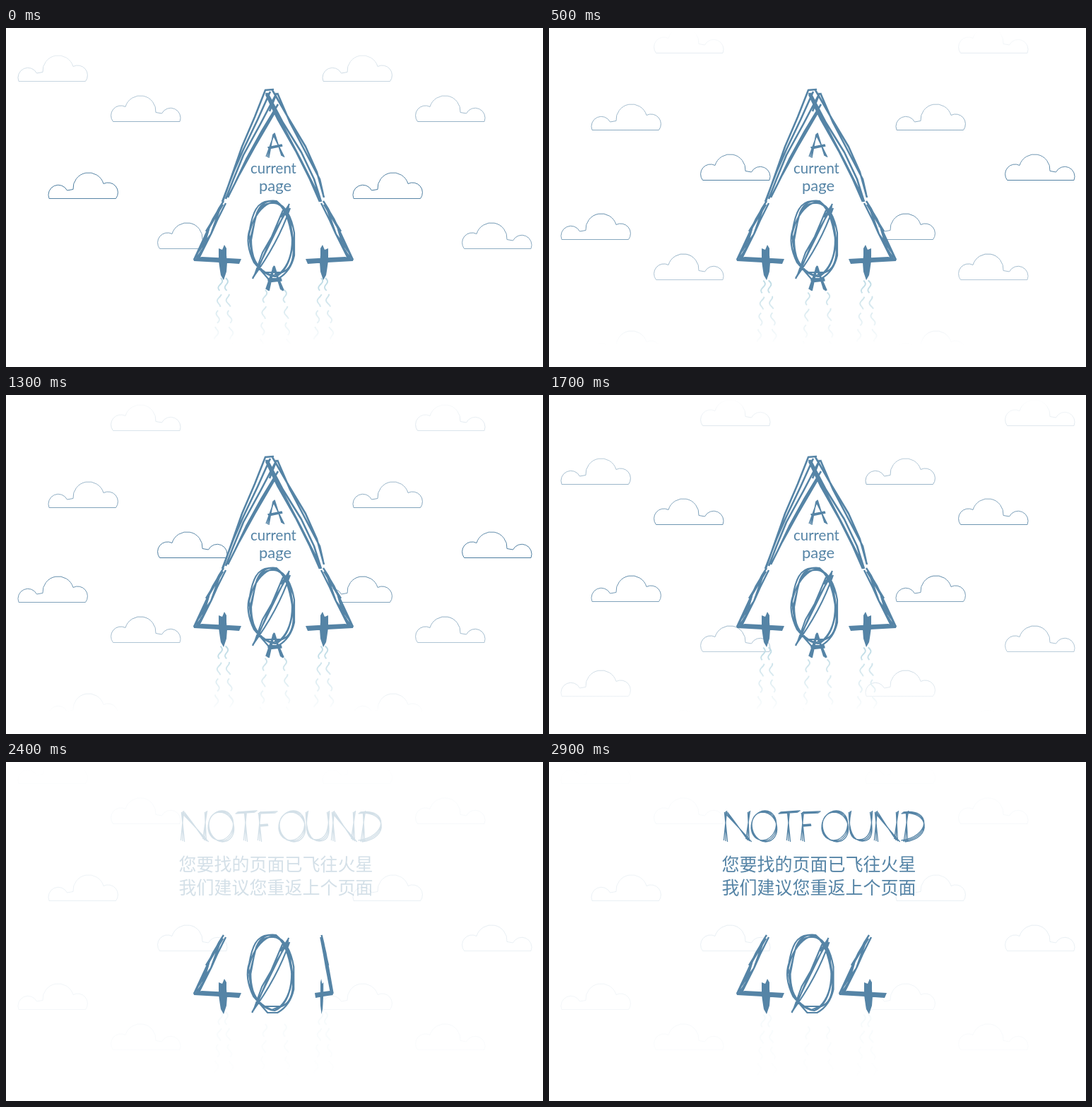
Recreate the animation shown at these times as an HTML page with a canvas. Size 760 by 480 pixels, loop 3.4 s.

```html
<!DOCTYPE html>
<html lang="zh-CN">
<head>
<meta charset="utf-8">
<title>404</title>
<style>
html, body { margin: 0; width: 100%; height: 100%; overflow: hidden; background: #fff; }
canvas { display: block; }
</style>
</head>
<body>
<canvas id="stage" width="760" height="480"></canvas>
<script>
const ctx = document.getElementById('stage').getContext('2d');
const BLUE = '#5584a6', CLOUD = '#4b7c9f', FLAME = '#60a8c0';
const LOOP = 3400, TICK = 100;

const shape = d => new Path2D(d);
const ramp = (t, from, to) => Math.min(1, Math.max(0, (t - from) / (to - from)));

// Adds a transformed path, so that line widths stay unscaled.
function addTo(target, path, a, c, e, f) {
  target.addPath(path, new DOMMatrix([a, 0, c, 1, e, f]));
  return target;
}

// Three copies of a path, each leaning differently around midY.
function sketch(path, lean, midY, jitter) {
  const copies = new Path2D();
  for (const side of [-1, 0, 1])
    addTo(copies, path, 1, side * lean, -side * lean * midY + side * jitter / 2, side * jitter);
  return copies;
}

// Cloud: origin at the left end of its base line.
const cloud = shape('M2 0A14 14 0 0 1 27.5-11.5L36-13A22 22 0 0 1 79-21A14 14 0 0 1 96.5 0Z');
const cloudSpots = [[16, 0, 0], [149, 57, 1], [59, 166, 0], [215, 237, 1]]; // x, y, mirrored
const groupTops = [75, -246, -546, -866];
const travel = [[0, 0], [500, 224], [900, 357], [1300, 539], [1700, 672], [2200, 896]];

// Digits: x is measured from the stem of the four and the middle of the zero.
const fourLines = shape('M1 245L-6 256-23 290-39 326M4 248L-8 272-16 290-35 328M0 250L-19 282-33 315M-5 258L-17 292-37 320' +
  'M-2 250L-14 270-28 300-41 328M-20 285L-28 312-37 326M-8 262L-24 288');
const fourSolid = shape('M-42 327L-30 324-10 325 26 327 23 334-5 332-41 330ZM2 307L5 312 5 322 6 332 5 345 1 357-3 350-4 344-6 330-6 312-1 314Z');
const zeroLines = shape('M-3 245C-20 246-26 262-30 285Q-37 305-24 332L-4 355H10Q28 345 33 322V290Q27 255 8 247Z' +
  'M2 248Q-16 248-22 268L-28 300Q-28 325-16 342L2 351 14 346Q30 330 30 300L28 275Q18 246 2 248Z' +
  'M8 245Q-12 242-20 262L-30 302Q-26 335-8 346H16Q32 340 32 312Q30 262 8 245Z' +
  'M-6 250Q-24 262-31 292L-27 322Q-14 350 6 352Q26 344 31 305Q26 266 14 252Q4 244-6 250Z');
const slash = shape('M26 249L-26 355M24 256L-12 318-24 352M17 258L-20 345M27 255Q10 305-26 354M14 268L25 251M22 270L25 252');

const roof = shape('M367 88L352 126 334 168 320 208 307 245M374 90L356 130 336 172 322 204 306 246M382 94L360 136 336 180 322 214 311 242' +
  'M385 108L362 146 340 186 324 220 314 240M380 120L352 168 330 208 318 232' +
  'M377 88L400 128 424 168 440 204 450 240M370 92L392 134 418 176 436 214 446 246M368 94L384 128 410 174 430 214 444 246' +
  'M384 92L402 134 422 172 444 214 449 236M374 104L396 146 418 188 443 238' +
  'M366 88L379 87M368 92L384 124M383 92L373 118');
const hull = shape('M375 92L308 246 268 328H490L448 246Z');
const noseA = sketch(shape('M370 183L379 150 392 182M371 170L391 166'), 0.09, 167, 0.9);
const tailA = sketch(shape('M370 371L379 339 391 371M371 358L390 356'), 0.06, 355, 0.9);
const title = sketch(shape('M250 70V112M251 72Q270 94 284 112M283 70L281 110' +
  'M304 70C281 71 281 110 304 112C328 111 328 71 304 70' +
  'M326 72L354 70M339 71V112' +
  'M359 71V112M358 72L383 71M359 90L371 89' +
  'M405 70C381 71 380 110 405 112C429 111 429 71 405 70' +
  'M426 70C423 100 430 111 441 111C456 111 458 98 456 70' +
  'M463 70V112M464 72Q480 94 494 112M493 70L491 110' +
  'M507 70L505 112M500 72C540 66 542 107 501 112'), 0.1, 91, 1);

function cloudShift(t) {
  for (let i = 1; i < travel.length; i++) {
    const [t0, y0] = travel[i - 1], [t1, y1] = travel[i];
    if (t <= t1) return y0 + (y1 - y0) * ramp(t, t0, t1);
  }
  return travel[travel.length - 1][1];
}

function drawClouds(t) {
  const shift = cloudShift(t), sky = new Path2D();
  for (const top of groupTops)
    for (const [x, y, mirrored] of cloudSpots)
      for (const column of [0, 431])
        addTo(sky, cloud, mirrored ? -1 : 1, 0, x + column + (mirrored ? 99 : 0), Math.round(top + y + shift) + 0.5);
  ctx.strokeStyle = CLOUD;
  ctx.lineWidth = 1;
  ctx.stroke(sky);
}

function drawFlames(t) {
  const phase = t / TICK % 3 * 2;
  ctx.strokeStyle = FLAME;
  ctx.lineWidth = 1.9;
  ctx.setLineDash([21, 6]);
  ctx.lineDashOffset = -phase;
  for (const [x, top, drift] of [[304, 354, -7], [311, 354, 9], [367, 371, -6], [394, 371, 7], [446, 354, -8], [452, 354, 10]]) {
    ctx.beginPath();
    for (let y = top; y < 448; y += 2)
      ctx.lineTo(x + drift * (y - top) / 90 + 2.6 * Math.sin((y - top - phase) / 2.9), y);
    ctx.stroke();
  }
  ctx.setLineDash([]);
}

function drawFog() {
  const fog = ctx.createLinearGradient(0, 5, 0, 449);
  fog.addColorStop(0, '#fff');
  fog.addColorStop(0.5, '#fff0');
  fog.addColorStop(1, '#fff');
  ctx.fillStyle = fog;
  ctx.fillRect(0, 0, 760, 480);
}

function drawFour(stemX, scale) {
  ctx.lineWidth = 2.4;
  ctx.stroke(addTo(new Path2D(), fourLines, scale, 0, stemX, 0));
  ctx.fill(addTo(new Path2D(), fourSolid, scale, 0, stemX, 0));
}

function drawZero(x) {
  ctx.lineWidth = 2.2;
  ctx.stroke(addTo(addTo(new Path2D(), zeroLines, 1, 0, x, 0), slash, 1, 0, x, 0));
}

function drawRocket() {
  ctx.fillStyle = '#fff';
  ctx.fill(hull);
  ctx.fillStyle = BLUE;
  ctx.lineWidth = 2.6;
  ctx.stroke(roof);
  ctx.lineWidth = 1.5;
  ctx.stroke(noseA);
  ctx.lineWidth = 3;
  ctx.stroke(tailA);
  ctx.textAlign = 'center';
  ctx.font = '20.4px Lato, sans-serif';
  ctx.fillText('current', 378.5, 206);
  ctx.font = '22px Lato, sans-serif';
  ctx.fillText('page', 381, 231);
}

function drawMessage() {
  ctx.lineWidth = 1.3;
  ctx.stroke(title);
  ctx.textAlign = 'left';
  ctx.font = '300 25px "Noto Sans CJK SC", "Noto Sans CJK", sans-serif';
  ctx.fillText('您要找的页面已飞往火星', 244.5, 154);
  ctx.fillText('我们建议您重返上个页面', 244.5, 187);
}

function draw(t) {
  ctx.globalAlpha = 1;
  ctx.fillStyle = '#fff';
  ctx.fillRect(0, 0, 760, 480);

  ctx.globalAlpha = 1 - 0.87 * ramp(t, 1700, 2200);
  drawClouds(t);
  drawFlames(t);
  ctx.globalAlpha = 1;
  drawFog();

  ctx.strokeStyle = BLUE;
  ctx.lineJoin = 'round';
  ctx.globalAlpha = 1 - ramp(t, 1800, 2200);
  drawRocket();
  ctx.globalAlpha = ramp(t, 2230, 2900);
  drawMessage();

  ctx.globalAlpha = 1;
  const turn = ramp(t, 2100, 2900);
  const flip = -Math.cos(Math.PI * turn);
  drawFour(307, 1);
  drawZero(375 - 5.5 * turn * turn);
  drawFour(451 + flip - 4 * Math.sin(Math.PI * turn), flip);
}

const start = performance.now();
function frame() {
  const t = (performance.now() - start) % LOOP;
  draw(Math.floor(t / TICK) * TICK);
  requestAnimationFrame(frame);
}
frame();
</script>
</body>
</html>
```
